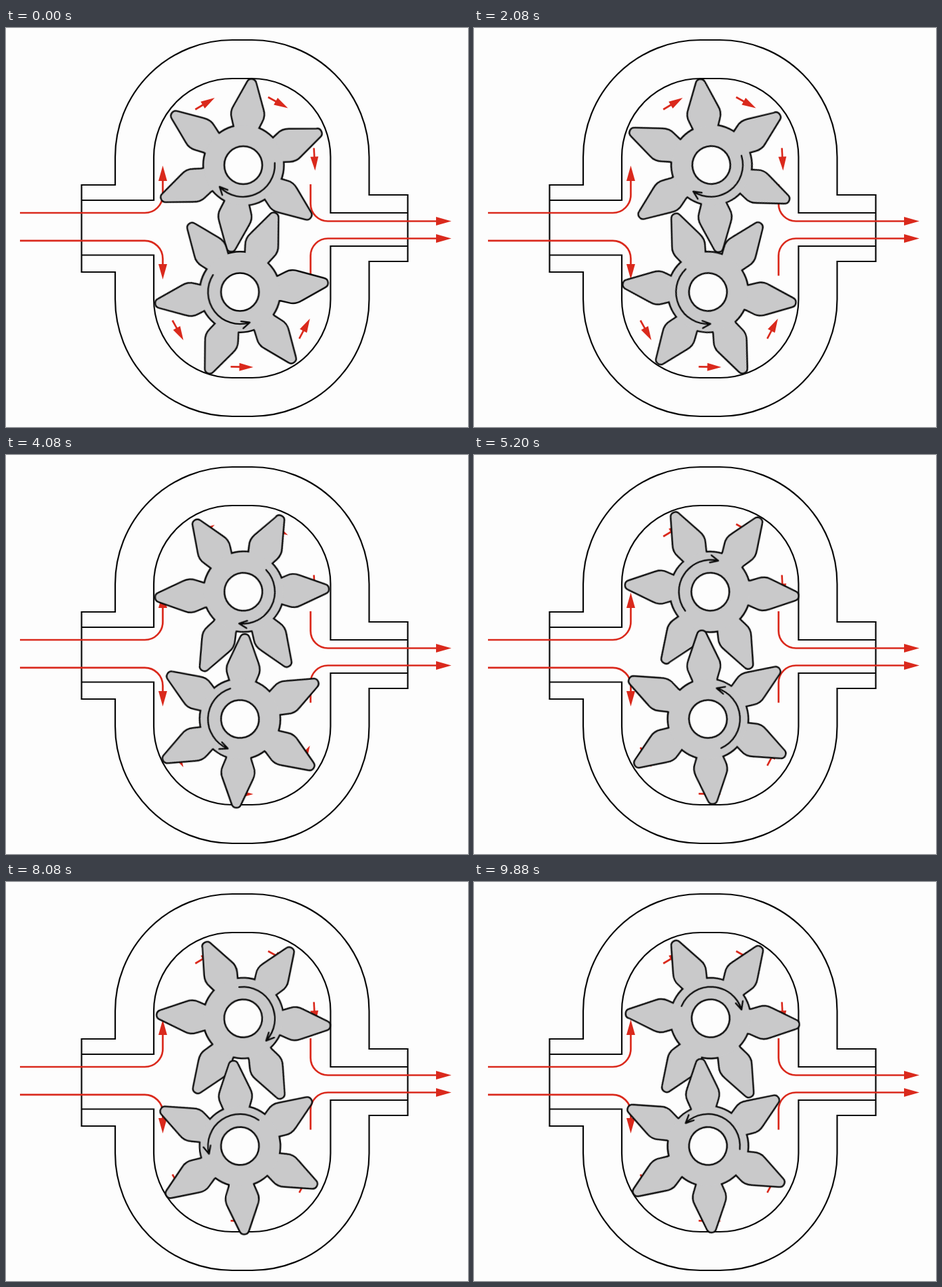
An HTML page that plays this animation: 694 px wide and 600 px high, repeating every 9920 ms.

```html
<!DOCTYPE html>
<html lang="en">
<head>
<meta charset="utf-8">
<title>Gear pump</title>
<style>
  html, body { margin: 0; width: 100%; height: 100%; overflow: hidden; background: #fdfdfd; }
  svg { display: block; }
  .line { fill: none; stroke: #070707; stroke-width: 2.2; stroke-linejoin: miter; }
  .flow { fill: none; stroke: #da291c; stroke-width: 2.7; }
  .heads { fill: #da291c; }
  .edge { fill: #0c0c0c; stroke: #0c0c0c; stroke-width: 5; stroke-linejoin: round; }
  .face { fill: #c9c9ca; }
  .hole { fill: #fdfdfd; stroke: #0c0c0c; stroke-width: 2.6; }
  .turn { fill: none; stroke: #0c0c0c; stroke-width: 2.4; stroke-linecap: round; stroke-linejoin: round; }
  /* 248 steps of 6.667deg; the small delay keeps each step clear of its boundary */
  .gear { transform-origin: 0 0; animation: spin 9920ms steps(248, end) -4ms infinite; }
  .cw { --end: 1653.333deg; }
  .ccw { --end: -1653.333deg; }
  @keyframes spin {
    from { transform: rotate(0deg); }
    to { transform: rotate(var(--end)); }
  }
</style>
</head>
<body>
<svg width="694" height="600" viewBox="0 0 694 600">
  <defs>
    <path id="tooth" d="M45-16.5 L57-17.6 L69-22 Q78-26 88-21.2 L125.2-5.9 A6.2 6.2 0 0 1 125.2 5.9 L88 21.2 Q78 26 69 22 L57 17.6 L45 16.5Z"/>
    <g id="teeth">
      <use href="#tooth"/>
      <use href="#tooth" transform="rotate(60)"/>
      <use href="#tooth" transform="rotate(120)"/>
      <use href="#tooth" transform="rotate(180)"/>
      <use href="#tooth" transform="rotate(240)"/>
      <use href="#tooth" transform="rotate(300)"/>
    </g>
    <!-- the teeth sit slightly off the pivot, so each gear wobbles -->
    <g id="upper">
      <use href="#teeth" transform="translate(-2.3 .8) rotate(37.1)"/>
      <circle cx="1" cy=".6" r="59.4"/>
    </g>
    <g id="lower">
      <use href="#teeth" transform="translate(2.5 1.6) rotate(52.9)"/>
      <circle r="59.4"/>
    </g>
    <path id="turn" d="M48 0 A48 48 0 0 1 -36.8 30.9 m11.8 5.5 l-11.8 -5.5 l3.4 12.6"/>
    <path id="big" d="M0 0 L-23 -6.5 V6.5Z"/>
    <g id="small">
      <path class="flow" d="M-34 0 H-18"/>
      <path class="heads" d="M0 0 L-21 -6 V6Z"/>
    </g>
  </defs>

  <g class="line">
    <path d="M164 236 V194 A176 176 0 0 1 340 18 H369.500 A176 176 0 0 1 545.500 194 V251 H603.500 V351 H545.500 V408 A176 176 0 0 1 369.500 584 H340 A176 176 0 0 1 164 408 V367 H113.500 V236Z"/>
    <path d="M113 259 H222 V194 A118 118 0 0 1 340 76 H369.500 A118 118 0 0 1 487.500 194 V278 H603"/>
    <path d="M113 341.500 H222 V408 A118 118 0 0 0 340 526 H369.500 A118 118 0 0 0 487.500 408 V328 H603"/>
  </g>

  <g class="flow">
    <path d="M21 278 H208.500 A27 27 0 0 0 235.500 251 V228"/>
    <path d="M21 319.800 H208.500 A27 27 0 0 1 235.500 346.800 V357"/>
    <path d="M457.500 235 V264.500 A26 26 0 0 0 483.500 290.500 H648"/>
    <path d="M457.500 372.500 V342.500 A26 26 0 0 1 483.500 316.500 H648"/>
  </g>
  <g class="heads">
    <use href="#big" transform="translate(235.500 207) rotate(-90)"/>
    <use href="#big" transform="translate(235.500 378) rotate(90)"/>
    <use href="#big" transform="translate(669 290.500)"/>
    <use href="#big" transform="translate(669 316.500)"/>
  </g>
  <use href="#small" transform="translate(313.500 105) rotate(-31)"/>
  <use href="#small" transform="translate(423.500 120.500) rotate(29)"/>
  <use href="#small" transform="translate(464.300 214.500) rotate(87)"/>
  <use href="#small" transform="translate(266.500 469.500) rotate(61)"/>
  <use href="#small" transform="translate(371.500 510) rotate(1)"/>
  <use href="#small" transform="translate(456.500 437) rotate(-62)"/>

  <g transform="translate(355.800 205.700)">
    <g class="gear cw">
      <use class="edge" href="#upper"/>
      <use class="face" href="#upper"/>
      <circle class="hole" cx=".6" cy=".5" r="28.500"/>
      <use class="turn" href="#turn" transform="rotate(-3.2)"/>
    </g>
  </g>
  <g transform="translate(351.500 397)">
    <g class="gear ccw">
      <use class="edge" href="#lower"/>
      <use class="face" href="#lower"/>
      <circle class="hole" r="28.500"/>
      <use class="turn" href="#turn" transform="rotate(212.300) scale(1 -1)"/>
    </g>
  </g>
</svg>
</body>
</html>
```
